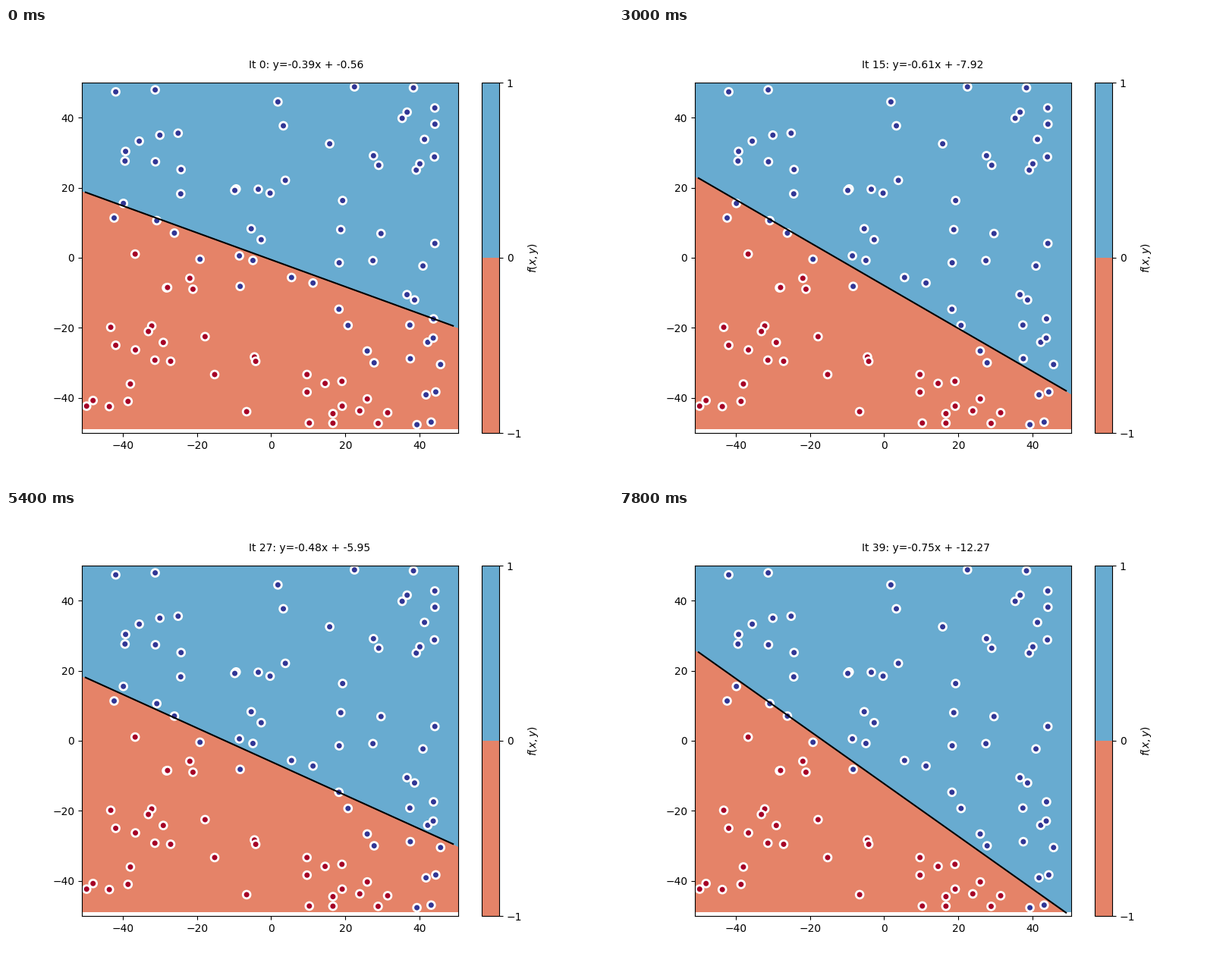
A matplotlib script for the animation above (8000 ms loop, 800 px wide and 600 px high).

```python
import numpy as np
import matplotlib.pyplot as plt
from matplotlib.animation import FuncAnimation
from matplotlib.cm import ScalarMappable
from matplotlib.colors import BoundaryNorm, ListedColormap

STEPS, STEP_MS = 40, 200
SAMPLES = 100
X_MIN, X_MAX = -51.0, 50.4      # sample range plus a margin of one
Y_MIN = -48.9                   # lower end of the filled area
RED, BLUE = plt.get_cmap("RdBu")([0.25, 0.75])
DARK_RED, DARK_BLUE = plt.get_cmap("RdYlBu")([0.0, 1.0])

# Key poses of the decision line, with a swing in slope between them.
KEY_STEP = [0, 8, 15, 20, 27, 34, 39]
KEY_SLOPE = [-0.385, -0.342, -0.613, -0.213, -0.48, -0.464, -0.751]
KEY_OFFSET = [-0.56, -3.22, -7.92, -6.08, -5.95, -9.64, -12.27]
SWING = 0.12


def decision_line(step):
    phase = np.interp(step, KEY_STEP, range(len(KEY_STEP)))
    slope = np.interp(step, KEY_STEP, KEY_SLOPE)
    offset = np.interp(step, KEY_STEP, KEY_OFFSET)
    return slope - SWING * np.sin(2 * np.pi * phase), offset


def make_samples():
    """Uniform points, labelled by the line the model is learning."""
    rng = np.random.default_rng(12)
    x = rng.uniform(X_MIN + 1, X_MAX - 1, SAMPLES)
    y = rng.uniform(Y_MIN + 1, 49.2, SAMPLES)
    return x, y, y > -0.7 * x - 20.6


plt.rcParams["font.family"] = "DejaVu Sans"
fig = plt.figure(figsize=(8, 6), dpi=100)
ax = fig.add_axes([0.125, 0.11, 0.62, 0.77])
ax.set(xlim=(X_MIN, X_MAX), ylim=(-50, 50),
       xticks=range(-40, 41, 20), yticks=range(-40, 41, 20))

# Class regions
ax.axhspan(Y_MIN, 50, color=RED, lw=0, zorder=0)
upper, = ax.fill([X_MIN, X_MAX, X_MAX, X_MIN], [0, 0, 51, 51],
                 color=BLUE, lw=0, antialiased=False, zorder=0.1)
ax.axhspan(-50, Y_MIN, color="white", lw=0, zorder=0.2)

px, py, positive = make_samples()
colors = np.where(positive[:, None], DARK_BLUE, DARK_RED)
ax.scatter(px, py, s=50, c=colors, edgecolors="white", linewidths=2)
border, = ax.plot([], [], color="black", lw=1.5)
title = fig.text(0.4, 547 / 600, "", fontsize=10)

# Colour scale
cax = fig.add_axes([627 / 800, 0.11, 23.1 / 800, 0.77])
scale = ScalarMappable(BoundaryNorm([-1, 0, 1], 2), ListedColormap([RED, BLUE]))
bar = fig.colorbar(scale, cax=cax, ticks=[-1, 0, 1])
bar.set_label("$f(x, y)$")


def update(step):
    slope, offset = decision_line(step)
    ends = np.array([-50, 49])
    border.set_data(ends, slope * ends + offset)
    upper.set_xy([(X_MIN, slope * X_MIN + offset),
                  (X_MAX, slope * X_MAX + offset),
                  (X_MAX, 51), (X_MIN, 51)])
    title.set_text(f"It {step}: y={slope:.2f}x + {offset:.2f}")
    return upper, border, title


anim = FuncAnimation(fig, update, frames=STEPS, interval=STEP_MS,
                     init_func=lambda: update(0), repeat=True, repeat_delay=0)
plt.show()
```
